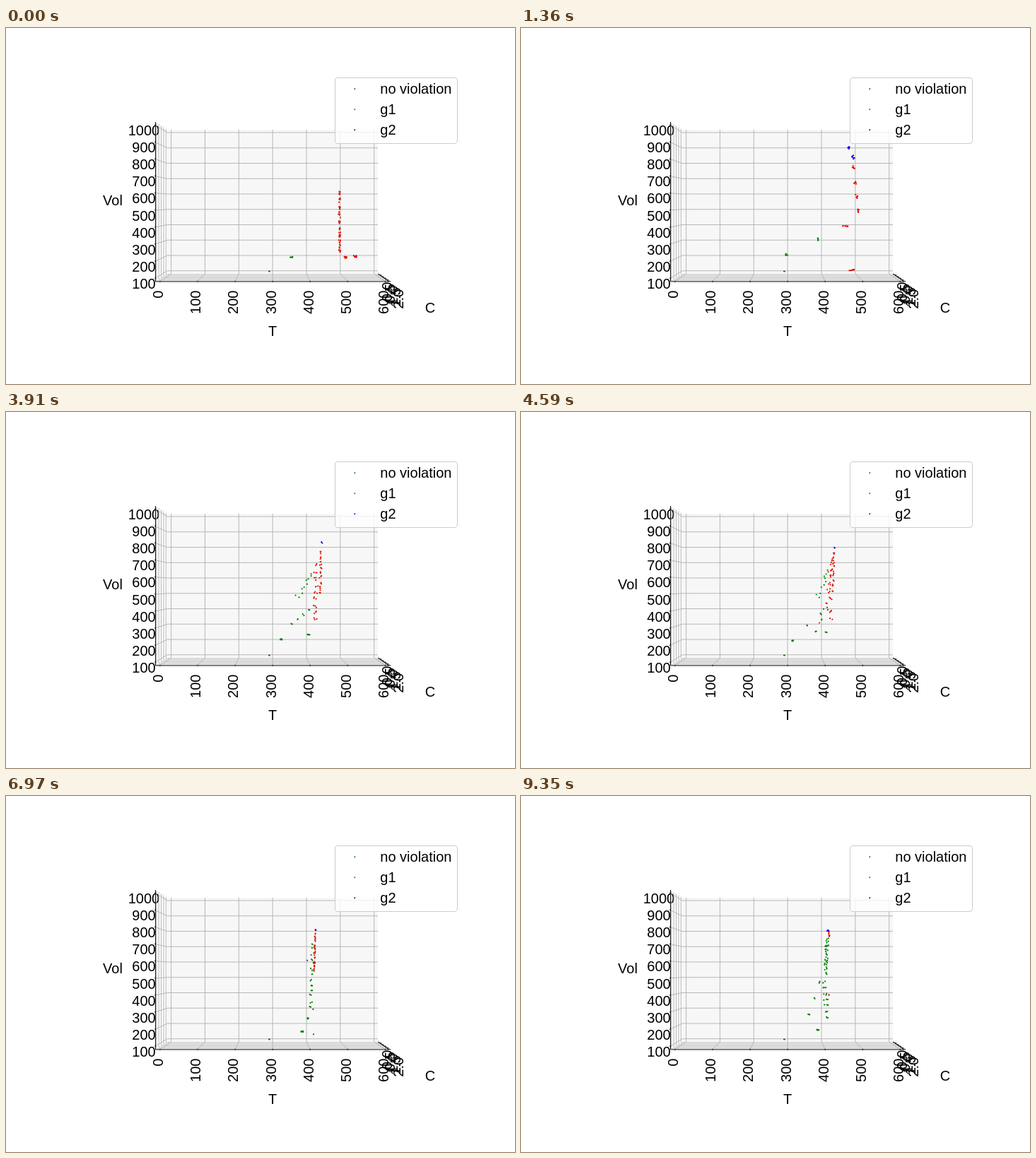
Write an HTML page that moves like this. It is 720 px wide and 504 px high and loops after 9520 ms.

```html
<!DOCTYPE html>
<html lang="en">
<head>
<meta charset="utf-8">
<title>3D scatter</title>
<style>
html, body { margin: 0; width: 100%; height: 100%; overflow: hidden; background: #fff; }
svg { display: block; width: 720px; height: 504px; }
text { font: 20px "Liberation Sans", Arial, sans-serif; fill: #000; }
.grid { stroke: #b0b0b0; stroke-width: .9; fill: none; }
.axis { stroke: #000; stroke-width: .9; fill: none; }
.dots { fill: none; stroke-width: 2.2; stroke-linecap: round; }
</style>
</head>
<body>
<svg id="plot" viewBox="0 0 720 504"></svg>
<script>
const plot = document.getElementById('plot');
const STEP = 170, STEPS = 56;
const COLORS = { green: '#008000', dark: '#4a3c28', red: '#e01200', blue: '#1400d8' };

function add(tag, attrs, text) {
  const el = document.createElementNS('http://www.w3.org/2000/svg', tag);
  for (const k in attrs) el.setAttribute(k, attrs[k]);
  if (text) el.textContent = text;
  plot.append(el);
  return el;
}
const line = (cls, ...p) => add('path', { class: cls, d: 'M' + p.join(' ') });
const label = (x, y, s, anchor = 'middle') => add('text', { x, y, 'text-anchor': anchor }, s);
const upright = (x, y, s) =>
  add('text', { transform: `translate(${x} ${y}) rotate(-90)`, 'text-anchor': 'end' }, s);

// The near edge is the back wall scaled about its centre.
const nearX = x => 377 + (x - 377) * 1.11;
const nearY = y => 246 + (y - 246) * 1.108;

function drawAxes() {
  add('path', { d: 'M228 144H526V348H228Z', fill: '#f7f7f7' });
  add('path', { d: 'M211 133L228 144V348L211 359Z', fill: '#fcfcfc' });
  add('path', { d: 'M211 359L228 348H526L542 359Z', fill: '#fafafa' });
  for (let i = 0; i < 7; i++) {
    const x = 233.6 + i * 47.85;
    line('grid', nearX(x), 359, x, 348, x, 144);
    line('axis', nearX(x), 357.5, nearX(x), 360);
    upright(222 + i * 53.2, 371.5, String(i * 100));
  }
  for (let i = 0; i < 10; i++) {
    const y = 148 + i * 21.75;
    line('grid', 211, nearY(y), 228, y, 526, y);
    line('axis', 210, nearY(y), 212.5, nearY(y) - .8);
    label(195, 152 + i * 24.1, String(1000 - i * 100));
  }
  for (let i = 0; i < 5; i++) {
    const k = .1 + i * .2, x = 228 - 17 * k, r = 526 + 16 * k;
    line('grid', x, 144 - 11 * k, x, 348 + 11 * k, r, 348 + 11 * k);
    line('axis', r - 1, 347.8 + 11 * k, r + 4, 349 + 11 * k);
    upright(545.5 + i * 4.2, 359.5 + i * 2.6, (i / 2).toFixed(1));
  }
  line('axis', 211.5, 133, 211.5, 359, 542, 359, 526, 348);
  label(151, 251, 'Vol');
  label(377, 436, 'T');
  label(600, 403, 'C');
}

let seed = 7;
const random = () => (seed = seed * 16807 % 2147483647) / 2147483647;
const scatter = size => (random() + random() - 1) * size;

// Evenly spaced clumps of dots on the way from one point to another.
function strip(c, [x0, y0], [x1, y1], clumps, each, w = 2, h = 2) {
  const dots = [];
  for (let i = 0; i < clumps * each; i++) {
    const k = Math.floor(i / each) / Math.max(1, clumps - 1);
    dots.push({ c, x: x0 + (x1 - x0) * k + scatter(w), y: y0 + (y1 - y0) * k + scatter(h) });
  }
  return dots;
}
const clump = (c, p, n, w = 3, h = 1) => strip(c, p, p, 1, n, w, h);
const pose = (step, ...parts) => ({ step, dots: parts.flat().sort((a, b) => a.y - b.y) });

const poses = [
  pose(0,
    strip('red', [471.5, 234], [472, 315], 9, 7, 1.5, 5),
    strip('red', [480, 323.5], [494, 323.5], 2, 9, 2.5, 2.5),
    clump('green', [403.5, 324.5], 6)),
  pose(8,
    strip('blue', [463.5, 168.5], [470, 183], 2, 7, 2, 4),
    strip('red', [470.5, 198], [477, 259], 4, 7, 2, 3.5),
    clump('red', [460, 280.5], 8, 6),
    clump('red', [468, 342.5], 8, 6),
    strip('green', [375.5, 320.8], [420, 299], 2, 6)),
  pose(15,
    strip('blue', [461, 180], [460, 187], 2, 6, 2, 3),
    strip('red', [457, 196.5], [453, 278], 5, 6, 5, 3),
    strip('dark', [450, 238], [446, 297], 4, 3, 7),
    clump('green', [394.5, 324.8], 6),
    strip('green', [428.5, 312], [424, 295.5], 2, 5, 3, 1)),
  pose(23,
    clump('blue', [447, 185], 2, 1, 2),
    strip('red', [445.5, 199], [445, 254], 9, 3, 2, 4),
    strip('red', [438.5, 217], [437, 293], 9, 3, 4, 3),
    strip('green', [434, 228], [411, 264], 10, 1, 9, 4),
    strip('green', [429, 280], [403, 300], 4, 2),
    strip('green', [388, 322.3], [428, 315], 2, 6, 4, 1)),
  pose(32,
    strip('red', [439.5, 201], [437, 241], 7, 4, 2, 3),
    strip('red', [437, 250], [441, 294], 4, 3, 3),
    strip('green', [434, 210], [427, 284], 9, 2, 4, 3),
    clump('red', [436.7, 307.5], 3, 1),
    strip('green', [378.5, 326], [404.5, 305], 2, 5, 2, 1)),
  pose(41,
    clump('blue', [437.5, 190], 2, 1),
    strip('red', [437.5, 192], [436, 246], 10, 4, 1, 4),
    strip('green', [433.5, 208], [431, 298], 13, 2, 3, 3),
    strip('dark', [432, 234], [435, 337], 4, 1, 7),
    strip('green', [418.5, 333.3], [427, 314.5], 2, 7, 3, 1)),
  pose(55,
    clump('blue', [435, 190.5], 7, 2.5),
    strip('red', [435.5, 193.5], [436, 198], 2, 3, 1),
    clump('red', [436, 281.5], 2, 1),
    strip('green', [433, 204], [431.5, 250], 9, 4, 3, 4),
    strip('green', [429, 263], [433, 314], 7, 3, 4),
    strip('green', [408, 309.5], [422, 264], 3, 3),
    clump('green', [420, 331.3], 6))
];

function dotsAt(step) {
  const next = Math.max(1, poses.findIndex(p => p.step >= step));
  const a = poses[next - 1], b = poses[next];
  const k = (step - a.step) / (b.step - a.step);
  const n = Math.max(a.dots.length, b.dots.length);
  return Array.from({ length: n }, (_, i) => {
    const p = a.dots[Math.floor(i * a.dots.length / n)];
    const q = b.dots[Math.floor(i * b.dots.length / n)];
    return { c: k < .5 ? p.c : q.c, x: p.x + (q.x - p.x) * k, y: p.y + (q.y - p.y) * k };
  });
}

drawAxes();
const layers = {};
for (const c in COLORS) layers[c] = add('path', { class: 'dots', stroke: COLORS[c] });

add('rect', { x: 465.5, y: 70.5, width: 173, height: 93, rx: 3.5, fill: '#fff', 'fill-opacity': .8, stroke: '#ccc' });
const keys = ['no violation', 'g1', 'g2'].map((s, i) => {
  label(529.3, 93 + i * 29, s, 'start');
  return add('circle', { cx: 493.3, cy: 86.3 + i * 29, r: 1, fill: '#d02418' });
});

let shown = -1;
function draw(step) {
  const paths = { green: 'M372 344.5h1', dark: '', red: '', blue: '' };
  for (const { c, x, y } of dotsAt(step)) paths[c] += `M${x.toFixed(1)} ${y.toFixed(1)}h0`;
  for (const c in paths) layers[c].setAttribute('d', paths[c]);
  keys[0].setAttribute('fill', step > 8 ? COLORS.green : '#444');
  keys[2].setAttribute('fill', step > 8 && step < 37 ? COLORS.blue : '#111');
}
function tick() {
  const step = Math.floor(performance.now() / STEP) % STEPS;
  if (step !== shown) draw(shown = step);
  requestAnimationFrame(tick);
}
tick();
</script>
</body>
</html>
```
